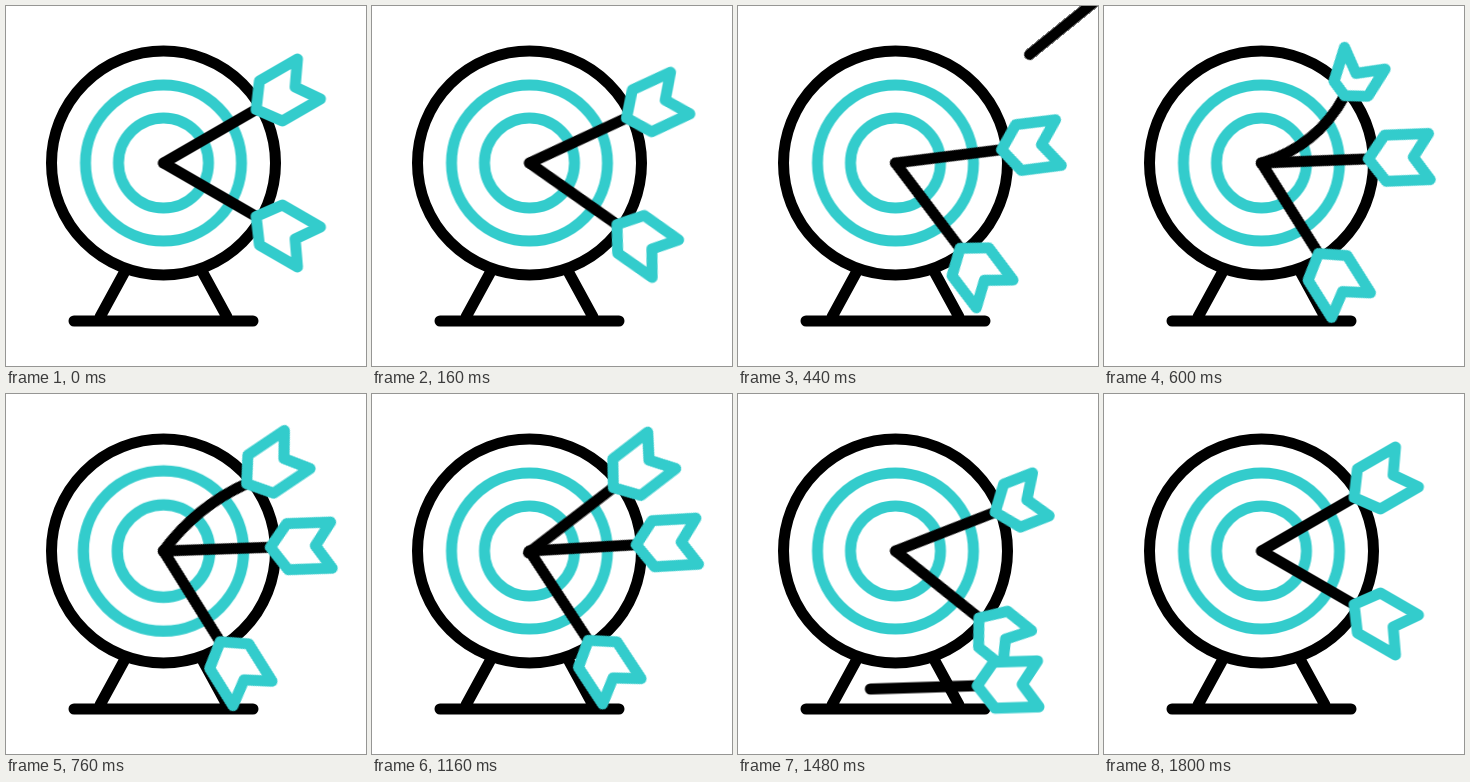
These frames come from a looping animation (360x360 px, 2 s). An HTML page:

```html
<!DOCTYPE html>
<html lang="en">
<head>
<meta charset="utf-8">
<title>Target and arrows</title>
<style>
  html, body { margin: 0; width: 100%; height: 100%; overflow: hidden; background: #fff; }
  svg { display: block; width: 100%; height: 100%; }
  svg * { animation-duration: 2s; animation-iteration-count: infinite; }

  .ink, .teal { stroke-width: 11; stroke-linecap: round; stroke-linejoin: round; }
  .ink { stroke: #000; fill: none; }
  .teal { stroke: #3cc; fill: #fff; }
  .hollow { fill: none; }

  /* the two stuck arrows turn with the wheel and back */
  .spin { animation-name: spin; }
  @keyframes spin {
    0%, 2% { transform: rotate(0deg); animation-timing-function: cubic-bezier(.35, .2, .6, 1); }
    32%, 56% { transform: rotate(28deg); animation-timing-function: cubic-bezier(.3, .2, .56, 1); }
    90%, 100% { transform: rotate(0deg); }
  }

  /* feathers drag a little while turning */
  .drag { animation-name: drag; animation-timing-function: ease-in-out; }
  @keyframes drag {
    0%, 2%, 30%, 58%, 90%, 100% { d: path("M0 0L17 -23L61 -23L45 0L61 23L17 23Z"); }
    17% { d: path("M0 0L17 -23L55.500 -23L38 0L55.500 23L17 23Z"); }
    74% { d: path("M0 0L18 -23L49 -23L34 0L49 23L18 23Z"); }
  }

  /* third arrow: flies in, quivers, falls */
  .fly { animation-name: fly; animation-timing-function: linear; }
  @keyframes fly {
    0%, 18% { transform: translate(290px, 0); }
    28%, 100% { transform: translate(0, 0); }
  }
  .bend { animation-name: bend; animation-timing-function: ease-in-out; }
  @keyframes bend {
    0%, 28%, 46%, 100% { d: path("M0 0Q54 0 107 0"); }
    30% { d: path("M0 0Q54 22 107 0"); }
    38% { d: path("M0 0Q54 -14 107 0"); }
    43% { d: path("M0 0Q54 3 107 0"); }
  }
  .tilt { animation-name: tilt; animation-timing-function: ease-in-out; }
  @keyframes tilt {
    0%, 28%, 46%, 100% { transform: rotate(0deg); }
    30% { transform: rotate(-24deg); }
    38% { transform: rotate(5deg); }
    43% { transform: rotate(-1deg); }
  }
  .squash { animation-name: squash; animation-timing-function: ease-in-out; }
  @keyframes squash {
    0%, 28%, 37%, 100% { d: path("M0 0L17 -23L61 -23L45 0L61 23L17 23Z"); }
    30% { d: path("M0 0L8 -16L43 -22L25 0L42 24L10 21Z"); }
  }
  .drop { animation-name: drop; }
  @keyframes drop {
    0%, 56% { transform: translate(0, 0); animation-timing-function: cubic-bezier(.33, 0, .67, .33); }
    84%, 100% { transform: translate(0, 334px); }
  }
  .tumble { animation-name: tumble; }
  @keyframes tumble {
    0%, 56% { transform: translate(0, 0) rotate(-39deg); animation-timing-function: cubic-bezier(.33, .06, .67, .5); }
    84%, 100% { transform: translate(-50px, 0) rotate(35deg); }
  }

  .pulse { animation-name: pulse; animation-timing-function: ease-in-out; }
  @keyframes pulse {
    0%, 30%, 46%, 100% { transform: scale(1); }
    38% { transform: scale(1.027); }
  }
</style>
</head>
<body>
<svg viewBox="0 0 360 360">
  <path class="ink" d="M118 267L94 311M197 267L221 311M68 315H247"/>
  <g transform="translate(157.500 157)">
    <circle class="ink" r="112"/>
    <g class="pulse">
      <circle class="teal hollow" r="78"/>
      <circle class="teal hollow" r="45"/>
    </g>

    <g class="spin">
      <g transform="rotate(-30)">
        <path class="ink" d="M0 0H107"/>
        <g transform="translate(107 0)">
          <path class="teal drag" d="M0 0L17 -23L61 -23L45 0L61 23L17 23Z"/>
        </g>
      </g>
      <g transform="rotate(30)">
        <path class="ink" d="M0 0H107"/>
        <g transform="translate(107 0)">
          <path class="teal drag" d="M0 0L17 -23L61 -23L45 0L61 23L17 23Z"/>
        </g>
      </g>
    </g>

    <g class="drop">
      <g class="tumble">
        <g class="fly">
          <path class="ink bend" d="M0 0Q54 0 107 0"/>
          <g transform="translate(107 0)">
            <g class="tilt">
              <path class="teal squash" d="M0 0L17 -23L61 -23L45 0L61 23L17 23Z"/>
            </g>
          </g>
        </g>
      </g>
    </g>
  </g>
</svg>
</body>
</html>
```
